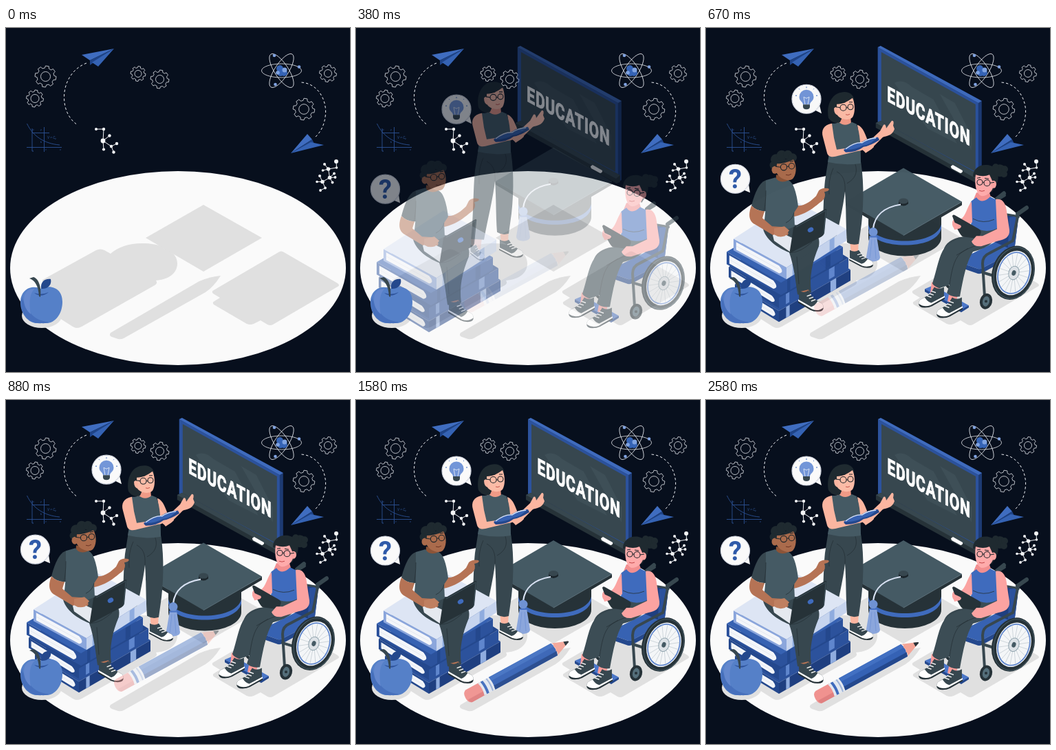
Write an HTML page that moves like this. It is 500x500 px and loops after 2.62 s.

```html
<!DOCTYPE html>
<html lang="en">
<head>
<meta charset="utf-8">
<title>Education</title>
<style>
html, body { margin: 0; width: 100%; height: 100%; overflow: hidden; background: #070f1d; }
svg { display: block; width: 100vw; height: 100vh; }
.line { fill: none; stroke: #e6e9ee; stroke-width: .8; stroke-linejoin: round; }
.dash { fill: none; stroke: #eef1f5; stroke-width: 1; stroke-dasharray: 3.5 3; }
.tube { fill: none; stroke: #37474f; stroke-width: 4; stroke-linecap: round; stroke-linejoin: round; }
.spec { fill: none; stroke: #1b252b; stroke-width: 1.1; }
.fold { fill: none; stroke: #263238; stroke-width: .8; }
.lace { fill: none; stroke: #fff; stroke-width: 1.2; }
</style>
</head>
<body>
<svg viewBox="0 0 500 500" xmlns="http://www.w3.org/2000/svg">
<rect width="500" height="500" fill="#070f1d"/>
<ellipse cx="250" cy="349" rx="244" ry="141" fill="#fafafa"/>

<g id="shadows" fill="#e0e0e0">
  <path d="M53 366L131 323Q137 320 143 323L152 328C163 318 181 312 202 313C231 314 249 327 249 342C249 356 238 365 218 367Q221 371 216 374L110 434Q103 438 97 434L53 406Z"/>
  <path d="M203 305L287 257L372 305L287 354Z"/>
  <path d="M152 443Q149 447 154 449L163 452Q167 453 171 451L290 384Q302 376 312 360Q298 361 281 368Z"/>
  <path d="M396 326Q400 323 404 326L482 371Q486 374 482 376L388 431Q384 433 380 431L370 425L360 430Q355 432 350 430L302 402Q299 399 303 397L311 392L301 386Q298 383 302 381Z"/>
  <ellipse cx="52" cy="418" rx="29" ry="18"/>
</g>

<g id="gears" class="line"></g>

<g id="atom">
  <g class="line" transform="translate(400.500 62)">
    <ellipse rx="29" ry="10"/><ellipse rx="28.500" ry="10" transform="rotate(57)"/><ellipse rx="28.500" ry="10" transform="rotate(-57)"/>
  </g>
  <g fill="#3563b5"><circle cx="398" cy="59" r="5"/><circle cx="404" cy="65" r="5"/><circle cx="399" cy="66" r="4"/></g>
  <g fill="#7fa2e0"><circle cx="405" cy="61" r="3.500"/><circle cx="395" cy="65" r="2.800"/>
  <circle cx="390" cy="40" r="2.300"/><circle cx="426" cy="56.500" r="2.300"/><circle cx="391.500" cy="82" r="2.300"/></g>
</g>

<path class="dash" d="M117 51C96 59 84 80 84.500 102C85 118 91 131 102 139.500"/>
<path class="dash" d="M429.500 79C454 81 466 105 464.500 125C463 142 457 152 448 160"/>
<g>
  <path d="M110 39L157 30L122 47Z" fill="#3f6dc0"/><path d="M122 47L157 30L122 54Z" fill="#1f4488"/>
  <path d="M125 50L157 30L134 56Z" fill="#3563b4"/>
  <path d="M414 182L438 154L445 162Z" fill="#3f6dc0"/><path d="M414 182L445 162L448 168Z" fill="#1f4488"/>
  <path d="M414 182L443 166L462 170Z" fill="#3563b4"/>
</g>

<g fill="none" stroke="#2b5194" stroke-width=".9">
  <path d="M30 173.500H81M55.500 144V180M38 146V179M38 152.500H63"/><path d="M30.500 139C39 157 55 168 78 170"/>
</g>
<g fill="#2f5699" font-family="Roboto, sans-serif" font-size="5" font-style="italic">
  <text x="60" y="161">V = C₂</text><text x="38" y="150" font-size="4">P</text><text x="50" y="149" font-size="4">y</text>
  <text x="50" y="167" font-size="4">b</text><text x="57" y="178" font-size="4">v</text><text x="38" y="180" font-size="4">a</text><text x="78" y="178" font-size="4">x</text>
</g>
<g id="molecules" fill="#f4f6f8" stroke="#f4f6f8"></g>

<g id="board">
  <path d="M250 28L254 26L401 106V221L396 224L250 143Z" fill="#1d3a72"/>
  <path d="M250 28L254 26L401 106L396 109Z" fill="#3f6bbd"/>
  <path d="M250 28L396 109V219L250 141Z" fill="#2c529c"/>
  <path d="M255 35L392 111V209L255 136Z" fill="#37474f"/>
  <g fill="#3e4f57"><path d="M274 80Q286 73 300 86L331 104L365 168L322 146Z"/><path d="M340 96L362 109L386 156V178Z"/></g>
  <path d="M247 138L254 135L399 214V224L394 226L247 145Z" fill="#263238"/>
  <path d="M247 138L254 135L399 214L393 219Z" fill="#37474f"/>
  <path d="M356 201L359 199L373 207Q374 210 370 211L357 204Z" fill="#fff"/>
  <text transform="matrix(.68 .37 0 1 263.500 106)" font-family="Roboto, Arial, sans-serif" font-weight="700" font-size="31" letter-spacing="1" fill="#fff" stroke="#fff" stroke-width="1.100" stroke-linejoin="round">EDUCATION</text>
</g>

<g id="cap">
  <path d="M236 270V305C236 320 260 332 289 332S342 320 342 305V270Z" fill="#263238"/>
  <path d="M236 286C240 302 264 310 289 310S338 302 342 286V292C338 309 314 316 289 316S240 309 236 292Z" fill="#3f6bbd"/>
  <path d="M203 253L287 301L372 253V258L287 308L203 258Z" fill="#263238"/>
  <path d="M287 204L372 253L287 302L203 253Z" fill="#455a64"/>
  <path d="M287 302L372 253" stroke="#5b6f79" fill="none"/>
  <path d="M280 252V256Q287 262 294 256V252Z" fill="#1b252b"/><ellipse cx="287" cy="252" rx="7" ry="4" fill="#37474f"/>
  <path d="M283 257C258 261 245 274 243 292" fill="none" stroke="#d9e2f3" stroke-width="2.200"/>
  <path d="M238 303H248L253 334Q253 339 243 340Q232 339 233 333Z" fill="#8ba6dc"/>
  <circle cx="243" cy="297" r="6.500" fill="#6f92d3"/><path d="M237 304H249" stroke="#4a74c6" stroke-width="2"/>
  <path d="M241 308L238 335M245 308L247 336" stroke="#7092d3" stroke-width=".8"/>
</g>

<g id="teacher">
  <path d="M167 320H183L181 337L168 337Z" fill="#fbb5a0"/>
  <use href="#shoe" transform="translate(166 328) scale(.6 .9)"/>
  <path d="M209 308H222L221 327L211 330Z" fill="#fbb5a0"/>
  <use href="#shoe" transform="translate(208 321)"/>
  <path d="M178 190L224 188C229 215 230 250 226 285L222 314Q213 317 205 312C203 285 204 262 202 238C199 264 192 290 186 323L167 322C171 292 170 250 173 222Z" fill="#37474f"/>
  <path class="fold" d="M202 238C203 222 199 214 190 209M216 196C222 210 216 220 205 226M185 204C180 215 178 227 179 242"/>
  <path d="M220 141C229 144 232 157 236 166L253 150L258 141Q261 139 262 146L270 135Q274 134 272 142L274 147C271 157 262 157 257 159L239 177C233 182 227 180 224 172Z" fill="#fbb5a0"/>
  <path d="M192 126H210L211 140Q202 147 190 141Z" fill="#f09a86"/>
  <path d="M183 139Q192 139 193 137Q202 145 212 137L219 140C224 154 225 171 225 197Q201 201 177 195C181 177 178 158 178 147Z" fill="#455a64"/>
  <path d="M183 139C171 141 167 149 170 159L176 182C178 189 186 188 192 186L221 179Q232 178 229 171L217 173L190 177L186 160Z" fill="#fbb5a0"/>
  <path d="M200 178Q214 167 227 166Q234 160 250 159L252 163Q238 172 229 173Q219 181 203 181Z" fill="#24488d"/>
  <path d="M200 177Q214 166 227 166Q234 160 250 159L240 167Q233 171 228 171Q217 178 200 177Z" fill="#3762b2"/>
  <path d="M203 176Q216 166 227 167Q235 161 247 160" fill="none" stroke="#dbe4f5" stroke-width="1.300"/>
  <path d="M227 176L239 170Q248 170 241 176L232 182Z" fill="#fbb5a0"/>
  <path d="M178 131C175 117 180 97 196 94C209 91 217 99 215 109L207 111C203 116 200 126 195 137C189 140 182 137 178 131Z" fill="#1f2a30"/>
  <path d="M190 111C199 111 206 107 213 102C217 111 217 123 213 130C207 136 193 133 190 125Z" fill="#fcbba6"/>
  <path d="M186 117Q190 112 192 121L192 127Q186 126 186 117Z" fill="#fbb5a0"/>
  <g class="spec"><circle cx="199.500" cy="116" r="4.500"/><circle cx="210" cy="115" r="4"/><path d="M204 116H206M189 115L195 116M196 109L202 108M208 108L213 108"/></g>
  <path d="M203 126Q206 127.500 209 125.500" stroke="#c4574e" fill="none"/>
</g>

<g id="idea">
  <path d="M156 118L168 124L164 108Z" fill="#fafafa"/><circle cx="146" cy="103" r="21" fill="#fafafa" stroke="#d5d9e3" stroke-width="1.200"/>
  <path d="M141 111C141 107 135.500 106 135.500 100A10.500 10.500 0 0 1 156.500 100C156.500 106 151 107 151 111Z" fill="#7396d8"/>
  <path d="M144 111L142 100L146 102L150 100L148 111" fill="none" stroke="#d6e1f4"/>
  <path d="M141 111H151V114Q151 118 146 118T141 114Z" fill="#37474f"/>
  <path d="M132 98H130M160 98H162M146 87V85M136 89L135 88M156 89L157 88" stroke="#3f6bbd"/>
</g>

<g id="books"></g>

<g id="student">
  <path d="M126 256C139 262 151 253 160 244L164 236Q169 231 178 233Q181 236 172 238Q175 245 169 251C158 259 148 270 127 274Z" fill="#b57355"/>
  <path d="M83 292C88 311 111 322 121 326C128 347 130 366 133 387Q143 390 153 384C150 361 154 341 164 317C168 299 153 290 130 286Z" fill="#37474f"/>
  <path class="fold" d="M121 326C133 327 143 320 154 311M132 332L135 372"/>
  <path d="M136 383L149 380L152 390L140 394Z" fill="#b57355"/>
  <use href="#shoe" transform="translate(134 379) scale(1.050 1.180)"/>
  <path d="M102 213L119 217L122 229Q113 237 101 228Z" fill="#8c5438"/>
  <path d="M87 221L101 217Q107 227 120 221Q130 226 134 259L128 268L129 288Q106 300 84 290L87 258Z" fill="#455a64"/>
  <path d="M87 221C76 225 70 243 66 258Q75 267 87 266Z" fill="#37474f"/>
  <path class="fold" d="M87 236C87 248 86 258 84 268M116 283Q126 278 128 268"/>
  <path d="M66 258C62 268 61 280 71 285L96 300Q106 308 117 304L120 298L112 289L96 288L82 276L85 266Q74 266 66 258Z" fill="#b57355"/>
  <path d="M97 301L106 296L128 306L122 325L99 309Z" fill="#e5e9ef"/>
  <path d="M99 291L114 288L121 294L115 302Q106 305 99 300Z" fill="#c08061"/>
  <path d="M129 288L173 263Q176 262 175 266L172 298Q171 301 168 303L124 326Q121 327 122 323L127 291Q127 289 129 288Z" fill="#263238"/>
  <path d="M131 289L174 265L171 299" fill="none" stroke="#455a64" stroke-width=".8"/>
  <ellipse cx="152" cy="293" rx="4.500" ry="3.300" transform="rotate(-30 152 293)" fill="#3f6bbd"/>
  <g fill="#1f2a30"><circle cx="102" cy="191" r="8"/><circle cx="110" cy="185" r="7.500"/><circle cx="119" cy="184" r="6.500"/><circle cx="126" cy="188" r="6"/><circle cx="98" cy="199" r="5.500"/><path d="M94 195L128 188V196L104 210L97 207Z"/></g>
  <path d="M103 197Q115 197 127 191C133 201 131 214 126 219C120 224 106 219 102 209Z" fill="#aa6b4c"/>
  <ellipse cx="100" cy="206" rx="4.500" ry="5.500" fill="#aa6b4c"/>
  <g class="spec"><circle cx="113" cy="202" r="4.600"/><circle cx="124.500" cy="200.500" r="4.200"/><path d="M118 201H120M101 201L108 202M109 195L115 194M122 194L127 193"/></g>
  <path d="M116 213Q120 215 124 212" stroke="#6b3424" fill="none"/>
</g>

<g id="question">
  <path d="M52 234L64 239L61 221Z" fill="#fafafa"/><circle cx="42.500" cy="219" r="21" fill="#fafafa" stroke="#d5d9e3" stroke-width="1.200"/>
  <text x="42.500" y="233" text-anchor="middle" font-family="Roboto, Arial, sans-serif" font-weight="700" font-size="38" fill="#2f5aa9">?</text>
</g>

<g id="apple">
  <path d="M51 379C62 373 82 376 82 398C82 416 71 430 57 429Q52 427 47 429C33 430 21 416 21 399C21 379 38 373 51 379Z" fill="#5580c8"/>
  <path d="M23 391C31 411 40 426 62 427Q57 430 52 429C33 431 18 415 23 391Z" fill="#4770bc"/>
  <path d="M27 388Q31 378 42 379C33 386 34 403 36 416Q23 405 27 388Z" fill="#6488ce"/>
  <path d="M41 385Q51 393 62 384Q51 389 41 385Z" fill="#2d529b"/>
  <path d="M50 391C52 376 47 364 40 362L34 364C42 367 47 374 48 390Z" fill="#37474f"/>
  <path d="M51 379C50 369 56 364 65 365C67 373 61 380 51 379Z" fill="#24488d"/>
</g>

<g id="pencil">
  <g transform="translate(160 434) rotate(-28.700)">
    <path d="M28 -10H5Q-1 -9 -1 0T5 10H28Z" fill="#f0928f"/><path d="M28 4H1Q2 10 5 10H28Z" fill="#e08080"/>
    <path d="M25 -10H43Q45 0 43 10H25Q28 0 25 -10Z" fill="#e3e8f0"/>
    <path d="M29 -10H33Q35 0 33 10H29Q31 0 29 -10Z" fill="#3f6bbd"/><path d="M38 -10H40Q42 0 40 10H38Q40 0 38 -10Z" fill="#9eb3d8"/>
    <path d="M43 -10H146Q150 0 146 10H43Q45 0 43 -10Z" fill="#3562b5"/>
    <path d="M43 -10H146L148 -4H44Z" fill="#4270c2"/><path d="M44 4H148L146 10H43Z" fill="#24488d"/>
    <path d="M146 -10L169 -1Q171 0 169 1L146 10Q150 7 147 3Q150 0 147 -4Q150 -7 146 -10Z" fill="#f4a597"/>
    <path d="M163 -3.300L169 -1Q171 0 169 1L163 3.300Z" fill="#263238"/>
  </g>
</g>

<g id="rider">
  <path class="tube" d="M424 249L434 243M430 270L454 274"/>
  <path d="M423 248L433 240" stroke="#37474f" stroke-width="6" stroke-linecap="round"/>
  <path class="tube" d="M350 371L347 327Q347 312 368 306L387 303" stroke-width="3"/>
  <ellipse cx="355" cy="368" rx="6" ry="9" fill="#fafafa" stroke="#263238" stroke-width="4"/>
  <path d="M419 270L448 274Q454 276 453 284L447 332L420 345Z" fill="#1f3f80"/><path d="M441 275L448 274Q454 276 453 284L447 332L438 336Z" fill="#2c529c"/>
  <path d="M364 339L420 311L449 324L401 349Q397 351 393 349Z" fill="#3762b2"/><path d="M364 339L393 349Q397 351 401 349L449 324V330L401 356Q397 358 393 356L364 346Z" fill="#24488d"/>
  <path d="M318 379L330 374L382 403L371 412Z" fill="#4b77c9"/><path d="M318 379L371 409L382 403V406L371 413L318 383Z" fill="#24488d"/>
  <path d="M328 369L340 374L338 387L326 385ZM354 382L366 387L363 401L351 397Z" fill="#f99c99"/>
  <use href="#shoe" transform="translate(347 374) scale(-1.080 1.150)"/>
  <use href="#shoe" transform="translate(373 389) scale(-1.080 1.150)"/>
  <path d="M388 287L423 289C427 307 412 319 388 325C378 341 374 363 369 390Q358 392 350 385L354 373L339 378Q331 375 329 371C336 350 338 331 347 319C357 309 369 306 382 302Z" fill="#3c4d55"/>
  <path class="fold" d="M354 373C357 353 360 337 369 328C380 319 394 316 405 311M364 330L381 320"/>
  <path d="M393 239H412L416 252Q402 261 388 251Z" fill="#f28f90"/>
  <path d="M386 251L393 246Q401 257 413 245L423 250C429 262 422 276 425 290Q405 301 385 286C389 273 378 263 386 251Z" fill="#3f6bbd"/>
  <path class="fold" d="M388 277Q403 285 419 278" stroke="#24488d"/>
  <path d="M386 252C379 260 378 273 370 278L359 279Q356 287 361 291L370 294L387 282Z" fill="#fba3a1"/>
  <path d="M358 273Q359 270 362 272L397 292Q401 295 399 299L396 306L373 303Q367 299 358 273Z" fill="#263238"/>
  <path d="M421 249C432 246 436 257 437 266L441 293C442 304 434 307 425 309L400 317Q389 318 386 310L393 302L402 302L423 292Z" fill="#fba3a1"/>
  <path d="M358 281L369 286Q373 288 369 291L361 293Z" fill="#fba3a1"/>
  <g fill="#1f2a30"><circle cx="427" cy="207" r="9"/><circle cx="434" cy="205" r="5"/><circle cx="421" cy="202" r="5"/><circle cx="433" cy="212" r="5"/><path d="M388 216C388 203 399 197 411 199C424 202 428 216 422 228L415 239L408 220Z"/></g>
  <path d="M392 213Q403 217 412 213L418 226C418 237 409 244 401 244C392 242 390 224 392 213Z" fill="#ffabab"/>
  <ellipse cx="418" cy="227" rx="4" ry="5.500" fill="#fba3a1"/>
  <g class="spec"><circle cx="398" cy="224" r="4"/><circle cx="408.500" cy="225" r="4.500"/><path d="M402 224H404M413 225L419 224M394 218L399 217M405 218L411 219"/></g>
  <path d="M397 236Q401 238 405 236" stroke="#c4474a" fill="none"/>
  <path class="tube" d="M405 390L402 342Q402 331 412 327L446 309"/>
  <path class="tube" d="M402 355L435 365M446 309L453 274"/>
  <path d="M453 270L466 261" stroke="#37474f" stroke-width="6" stroke-linecap="round"/>
  <ellipse cx="407" cy="397" rx="7" ry="9.500" fill="#546e7a" stroke="#263238" stroke-width="4" transform="rotate(14 407 397)"/><circle cx="407" cy="397" r="2" fill="#263238"/>
  <g id="wheel" transform="translate(446.500 355.500) rotate(18)">
    <ellipse rx="30.500" ry="40" fill="#263238"/><ellipse cx="1" rx="28.500" ry="38" fill="none" stroke="#455a64"/>
    <ellipse cx="1" rx="24.500" ry="33" fill="#f4f6f8"/><ellipse cx="1" rx="22.500" ry="30.500" fill="none" stroke="#5f86cd" stroke-width="1.800"/>
    <g id="spokes" stroke="#c3cbd2" stroke-width=".7"></g>
    <ellipse cx="1" rx="7.500" ry="10" fill="#dde2e7" stroke="#90a4ae"/><ellipse cx="1" rx="3" ry="4" fill="#455a64"/>
  </g>
</g>

<defs>
  <g id="shoe">
    <path d="M1 2Q8 6 14 2L20 11L33 18Q37 23 33 25Q28 28 20 24L1 14Z" fill="#37474f"/>
    <path d="M0 13L18 22Q23 21 27 15L33 18Q37 23 33 25Q27 28 20 25L0 16Z" fill="#fff"/>
    <path d="M0 15L19 25Q28 28 35 23Q35 28 27 28Q21 28 17 26L0 17Z" fill="#263238"/>
    <path class="lace" d="M12 9L18 7M15 12L21 10M18 15L24 13"/>
  </g>
</defs>
</svg>
<script>
const $ = id => document.getElementById(id);
const poly = (pts, fill) => `<path d="M${pts.map(p => p.join(' ')).join('L')}Z" fill="${fill}"/>`;
const mix = (a, b, k) => [a[0] + (b[0] - a[0]) * k, a[1] + (b[1] - a[1]) * k];
const down = (p, h) => [p[0], p[1] + h];

function gear(x, y, r, hole) {
  const pts = [];
  for (let i = 0; i < 8; i++) {
    for (const [step, k] of [[-.32, .8], [-.2, 1], [.2, 1], [.32, .8]]) {
      const a = (i + step + .2) * Math.PI / 4;
      pts.push([(x + r * k * Math.cos(a)).toFixed(2), (y + r * k * Math.sin(a)).toFixed(2)]);
    }
  }
  return poly(pts, 'none') + `<circle cx="${x}" cy="${y}" r="${hole}"/>`;
}
$('gears').innerHTML = [
  [57.5, 70.5, 15.5, 7], [42, 102.5, 12.5, 6], [192, 66.5, 11, 5],
  [223.5, 74.5, 13.5, 6], [468, 66, 12.5, 5.5], [433, 118, 15.8, 7.3]
].map(g => gear(...g)).join('');

// Each node: x, y, radius, index of the node it hangs on.
function molecule(nodes) {
  return nodes.map(([x, y, r, to]) => {
    const [px, py] = nodes[to];
    return `<path d="M${x} ${y}L${px} ${py}"/><circle cx="${x}" cy="${y}" r="${r}" stroke="none"/>`;
  }).join('');
}
$('molecules').innerHTML = molecule([
  [141, 164, 3.4, 0], [142, 147, 2.2, 0], [131, 147, 2, 1], [150.5, 156.5, 2.2, 0],
  [142, 176.5, 2.1, 0], [153, 172, 2.2, 0], [161, 168, 2.2, 5], [156.5, 180.5, 2.2, 5]
]) + molecule([
  [468.5, 205, 2.8, 0], [480.5, 203, 1.8, 0], [480, 194, 3, 1], [463, 198, 2, 0], [460.5, 207, 1.8, 0],
  [470.5, 217.5, 2.8, 0], [477, 211.5, 1.9, 5], [478.5, 217, 1.9, 5], [474.5, 224.5, 1.9, 5],
  [460, 223.5, 2.8, 5], [456, 215, 2, 9], [452, 223.5, 1.8, 9], [464, 232.5, 1.9, 9], [457, 236, 1.9, 12]
]);

// left, front and right corners of the lid, then height and colours
function book(l, f, r, h, lid, edge, spine, band) {
  const back = [l[0] + r[0] - f[0], l[1] + r[1] - f[1]];
  const strip = (a, b) => [mix(f, r, a), mix(f, r, b), down(mix(f, r, b), h), down(mix(f, r, a), h)];
  const j = mix(l, f, .05), k = mix(l, f, .86), bulge = down(mix(l, f, .97), h / 2);
  return poly([l, f, down(f, h), down(l, h)], edge)
    + `<path d="M${down(j, 3)}L${down(k, 3)}Q${bulge} ${down(k, h - 3)}L${down(j, h - 3)}Z" fill="#f4f6fa"/>`
    + `<path d="M${down(j, h * .5)}L${down(k, h * .5)}" stroke="#dfe4ed" stroke-width=".8"/>`
    + poly(strip(0, 1), spine) + poly(strip(.1, .15), band) + poly(strip(.72, .8), band)
    + poly([l, f, r, back], lid);
}
$('books').innerHTML =
  book([42, 372], [106, 411], [210, 351], 16, '#2c529c', '#24488d', '#1f3f80', '#8facdf') +
  book([33, 347], [106, 392], [207, 334], 15, '#24488d', '#24488d', '#2c529c', '#5f86cd') +
  book([30, 325], [109, 370], [199, 318], 18, '#3762b2', '#2c529c', '#2c529c', '#24488d') +
  book([40, 306], [117, 348], [204, 292], 17, '#dde5f4', '#8ba6dc', '#c6d4ee', '#8facdf');

$('spokes').innerHTML = Array.from({ length: 18 }, (_, i) => {
  const a = i * Math.PI / 9;
  return `<path d="M1 0L${1 + 22 * Math.cos(a)} ${30 * Math.sin(a)}"/>`;
}).join('');

const LOOP = 2620;
const curve = (u, a, b) => 3 * u * (1 - u) ** 2 * a + 3 * u * u * (1 - u) * b + u ** 3;

// cubic-bezier(.36, -.01, .5, 1.38)
function ease(x) {
  if (x >= 1) return 1;
  let lo = 0, hi = 1;
  for (let i = 0; i < 24; i++) {
    const mid = (lo + hi) / 2;
    if (curve(mid, .36, .5) < x) lo = mid; else hi = mid;
  }
  return curve(lo, -.01, 1.38);
}

// id, start x, start y, duration, opacity power
const parts = [
  ['board', -30, 0, 1000, 1], ['cap', 0, -60, 1000, 2], ['teacher', 0, -30, 1000, 1],
  ['idea', 0, 30, 1000, 1], ['books', 0, 30, 1000, 1], ['student', 0, 30, 1000, 1],
  ['question', 0, 30, 1000, 1], ['rider', 0, 30, 1000, 1], ['pencil', 0, -30, 2500, 1]
].map(([id, ...rest]) => [$(id), ...rest]);

function draw(t) {
  for (const [el, x, y, time, power] of parts) {
    const p = ease(t / time);
    el.setAttribute('transform', `translate(${x * (1 - p)} ${y * (1 - p)})`);
    el.setAttribute('opacity', Math.min(1, Math.max(0, p)) ** power);
  }
}

const start = performance.now();
function tick() {
  draw((performance.now() - start) % LOOP);
  requestAnimationFrame(tick);
}
draw(0);
requestAnimationFrame(tick);
</script>
</body>
</html>
```
